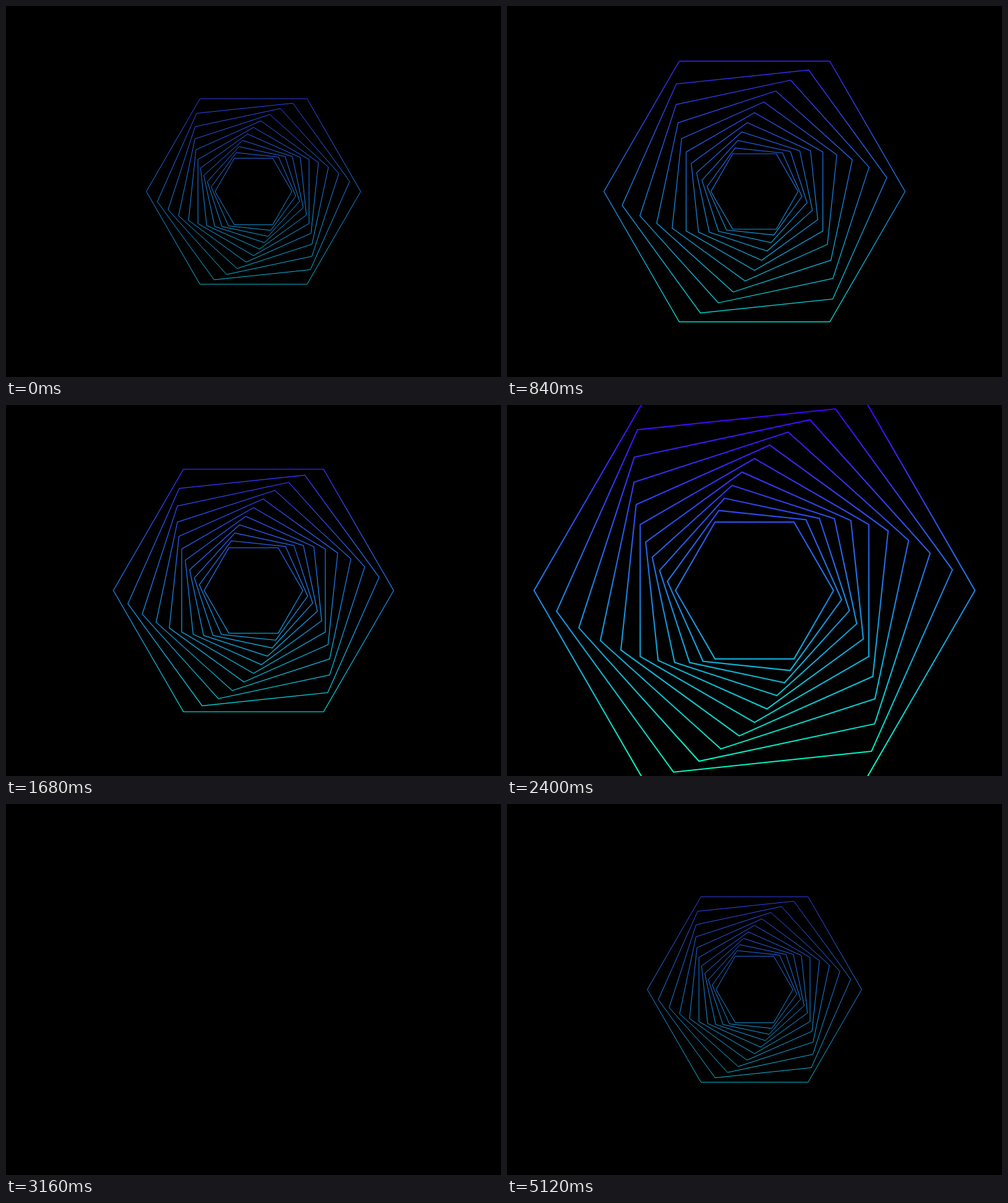
Recreate the animation shown at these times as an HTML page with a canvas. Size 800 px wide and 600 px high, loop 5.2 s.

```html
<!DOCTYPE html>
<html lang="en">
<head>
<meta charset="utf-8">
<title>Hexagon spiral</title>
<style>
  html, body { margin: 0; width: 100%; height: 100%; overflow: hidden; background: #000; }
  canvas { display: block; }
</style>
</head>
<body>
<canvas id="stage" width="800" height="600"></canvas>
<script>
const ctx = document.getElementById('stage').getContext('2d');
const LOOP = 5200, STEP = 40;
const COUNT = 11, RADIUS = 173.2, SHRINK = 0.9025, TWIST = -Math.PI / 30;
const LAG = 43.5;

// turning points of a ring's double beat: time, scale
const beats = [[90, 1], [270, 1.245], [438, 1.116], [925, 1.446], [1262, 1.279], [1690, 1.308]];

const clamp = (x, a = 0, b = 1) => Math.min(b, Math.max(a, x));
const sineInOut = u => (1 - Math.cos(Math.PI * u)) / 2;
const softLinear = u => (u + sineInOut(u)) / 2;
const expoInOut = u => u <= 0 ? 0 : u >= 1 ? 1
  : u < 0.5 ? 2 ** (20 * u - 11) : 1 - 2 ** (9 - 20 * u);

// each beat adds its eased step to the scale
function beat(t) {
  let scale = 1;
  for (let i = 1; i < beats.length; i++) {
    const [t0, v0] = beats[i - 1], [t1, v1] = beats[i];
    scale += (v1 - v0) * softLinear(clamp((t - t0) / (t1 - t0)));
  }
  return scale;
}

const ink = ctx.createLinearGradient(0, 0, 0, 600);
ink.addColorStop(0, '#4400ff');
ink.addColorStop(0.72, '#0cb8d8');
ink.addColorStop(1, '#00ffbf');

function hexagon(r, turn, width, drawn) {
  ctx.beginPath();
  for (let i = 0; i < 6; i++) {
    const a = turn + i * Math.PI / 3;
    ctx.lineTo(400 + r * Math.cos(a), 300 + r * Math.sin(a));
  }
  ctx.closePath();
  ctx.lineWidth = width;
  ctx.setLineDash(drawn < 1 ? [drawn * 6 * r, 7 * r] : []);
  ctx.stroke();
}

function render(t) {
  ctx.globalAlpha = 1;
  ctx.fillStyle = '#000';
  ctx.fillRect(0, 0, 800, 600);
  const entering = t >= 3160;
  const zoom = 1 + 1.6655 * expoInOut((t - 1927) / 1000);
  ctx.globalAlpha = entering ? 1 : clamp((3160 - t) / 600);
  ctx.strokeStyle = ink;
  for (let k = 0; k < COUNT; k++) {
    const drawn = entering ? sineInOut(clamp((t - 3780) / (1270 - 6 * k))) : 1;
    if (drawn < 0.007) continue;
    const scale = entering ? 1 : zoom * beat(t - k * LAG);
    hexagon(RADIUS * SHRINK ** k * scale, TWIST * k, scale, drawn);
  }
}

const start = performance.now();
function tick() {
  const t = (performance.now() - start) % LOOP;
  render(Math.floor(t / STEP) * STEP);
  requestAnimationFrame(tick);
}
tick();
</script>
</body>
</html>
```
